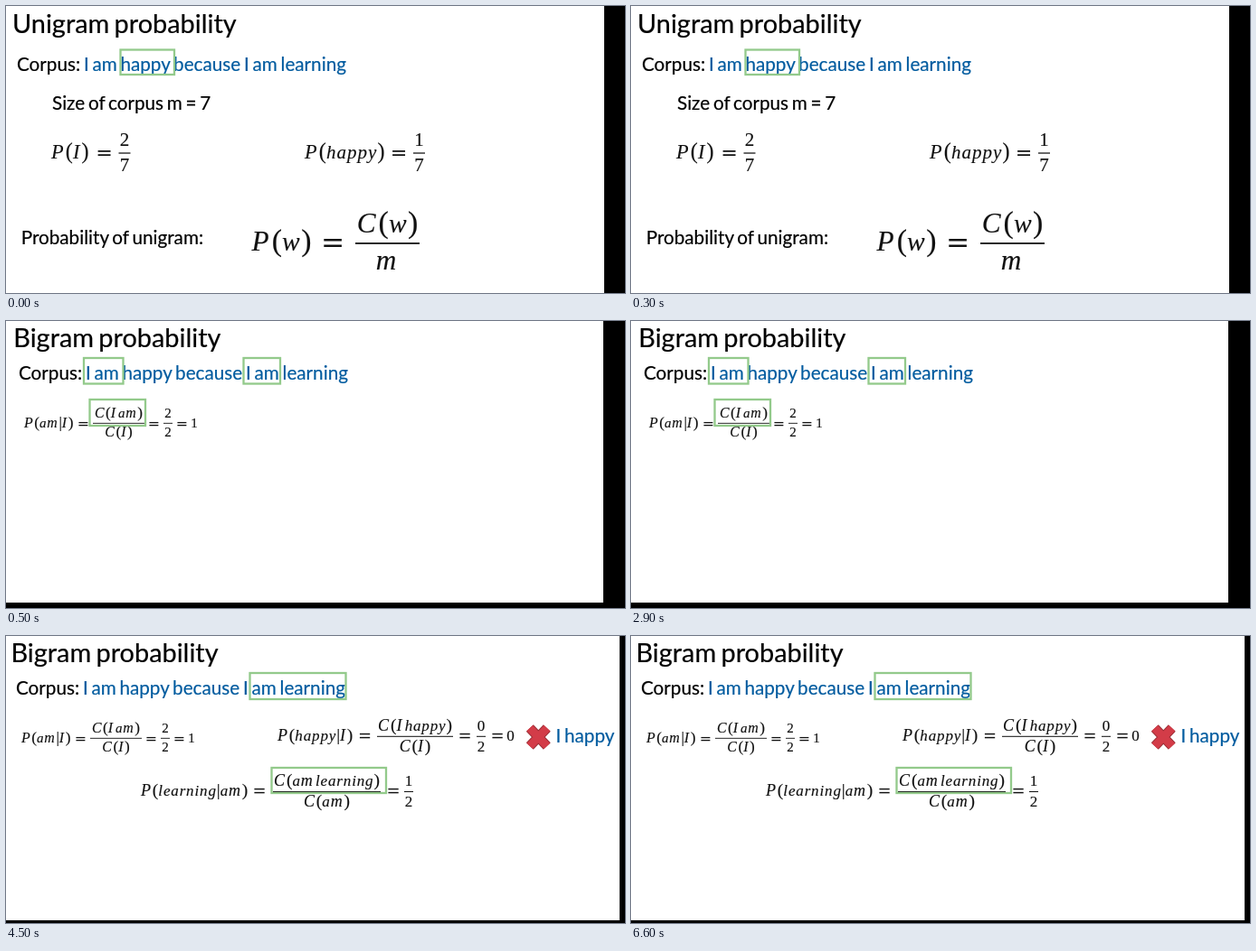
An HTML page for the animation above (8 s loop, 684x318 px).

```html
<!DOCTYPE html>
<html lang="en">
<head>
<meta charset="utf-8">
<title>N-gram probability</title>
<style>
  html, body { margin: 0; width: 100%; height: 100%; overflow: hidden; background: #000; }
  svg { display: block; }
  .sans { font-family: Lato, sans-serif; font-size: 20.7px; word-spacing: -.075em; stroke: #000; stroke-width: .2; }
  .title { font-size: 28.9px; }
  .blue { fill: #005b9f; stroke: #005b9f; }
  .math { font-family: "Liberation Serif", serif; fill: #111; stroke: #111; stroke-width: .15; }
  .equals { font-family: "DejaVu Serif", serif; fill: #111; }
  .low, .cap { font-style: italic; letter-spacing: .05em; }
  .cap { font-size: 1.06em; letter-spacing: .1em; }
  .paren { font-size: 1.15em; }
  .box { fill: none; stroke: #93ca8b; stroke-width: 2.3; }
</style>
</head>
<body>
<svg id="stage" width="684" height="318" viewBox="0 0 684 318"></svg>
<script>
const LOOP = 8000;

const sans = (x, y, text, cls = '') =>
  `<text class="sans ${cls}" x="${x}" y="${y}">${text}</text>`;

const corpus = (x, y) =>
  sans(x, y, 'Corpus: <tspan class="blue">I am happy because I am learning</tspan>');

const box = (x1, y1, x2, y2) =>
  `<rect class="box" x="${x1}" y="${y1}" width="${x2 - x1}" height="${y2 - y1}"/>`;

// Italic letters, upright taller parentheses, plain digits.
const glyphs = text => text.replace(/[A-Zm]|[a-ln-z]+|[()|]/g, run => {
  const cls = /[()|]/.test(run) ? 'paren' : /[A-Zm]/.test(run) ? 'cap' : 'low';
  return `<tspan class="${cls}">${run}</tspan>`;
});

const math = (x, y, size, text, anchor = 'middle') =>
  `<text class="math" x="${x}" y="${y}" font-size="${size}" text-anchor="${anchor}">${glyphs(text)}</text>`;

// The row helpers share one axis: the height of the fraction bars.
const row = (axis, size) => ({
  start: (x, text) => math(x, axis + size * .28, size, text, 'start'),
  mid: (x, text) => math(x, axis + size * .28, size, text),
  eq: x => `<text class="equals" x="${x}" y="${axis + size * .35}" font-size="${size * 1.06}" text-anchor="middle">=</text>`,
  frac: (x, width, num, den) =>
    math(x, axis - size * .4, size, num) +
    math(x, axis + size * .97, size, den) +
    `<rect x="${x - width / 2}" y="${axis - size * .03}" width="${width}" height="${size * .06}" fill="#111"/>`
});

const page = (width, height, body) =>
  `<rect width="${width}" height="${height}" fill="#fff"/>${body}`;

const cross = (x, y) => {
  const arms = 'd="M-9.5 -10L9.5 10M9.5 -10L-9.5 10" fill="none"';
  return `<g transform="translate(${x} ${y})">
    <path ${arms} stroke="#9c3038" stroke-width="11"/>
    <path ${arms} stroke="#d33c48" stroke-width="9"/></g>`;
};

function amGivenI(x) {
  const r = row(113.3, 15);
  return r.start(x, 'P(am|I)') + r.eq(x + 65.5) +
    r.frac(x + 104.5, 57, 'C(I\u200aam)', 'C(I)') + r.eq(x + 143.5) +
    r.frac(x + 159, 10, '2', '2') + r.eq(x + 174.5) + r.mid(x + 188, '1');
}

function unigram() {
  const small = row(163, 21), large = row(263, 29.5);
  return page(661, 318,
    sans(7, 29.5, 'Unigram probability', 'title') +
    corpus(12, 71.8) + box(126.5, 48.5, 186, 76) +
    sans(51, 114.5, 'Size of corpus m = 7') +
    small.start(50, 'P(I)') + small.eq(108.5) + small.frac(131, 13, '2', '7') +
    small.start(330, 'P(happy)') + small.eq(434) + small.frac(456.5, 13, '1', '7') +
    sans(16.7, 263.5, 'Probability of unigram:') +
    large.start(271.5, 'P(w)') + large.eq(361) + large.frac(421.5, 71, 'C(w)', 'm'));
}

function bigramFirst() {
  return page(660, 312,
    sans(8.3, 28.5, 'Bigram probability', 'title') +
    corpus(14, 65) + box(86, 41, 129.5, 69.5) + box(262.5, 41, 303, 69.5) +
    amGivenI(20) + box(92.5, 87, 154, 116));
}

function bigramAll() {
  const happy = row(111.3, 17), learn = row(172.5, 17);
  return page(678, 315,
    sans(5.5, 28.5, 'Bigram probability', 'title') +
    corpus(11, 65) + box(269.5, 41, 375.5, 70) +
    amGivenI(17) +
    happy.start(300, 'P(happy|I)') + happy.eq(396.5) +
    happy.frac(452, 84, 'C(I\u200ahappy)', 'C(I)') + happy.eq(507) +
    happy.frac(525, 10, '0', '2') + happy.eq(543) + happy.mid(557.5, '0') +
    cross(588.3, 112) + sans(607.5, 117.8, 'I happy', 'blue') +
    learn.start(149, 'P(learning|am)') + learn.eq(280) +
    learn.frac(354.5, 119, 'C(am\u200alearning)', 'C(am)') + learn.eq(428) +
    learn.frac(445, 10, '1', '2') + box(293.5, 146, 420, 174));
}

const scenes = [
  { from: 0, to: 500, draw: unigram },
  { from: 500, to: 4500, draw: bigramFirst },
  { from: 4500, to: LOOP, draw: bigramAll }
];

const stage = document.getElementById('stage');
stage.innerHTML = scenes.map(s => `<g visibility="hidden">${s.draw()}</g>`).join('');

const begin = performance.now();
function show() {
  const t = Math.max(0, performance.now() - begin) % LOOP;
  scenes.forEach((s, i) => {
    const on = t >= s.from && t < s.to;
    stage.children[i].setAttribute('visibility', on ? 'visible' : 'hidden');
  });
  requestAnimationFrame(show);
}
show();
</script>
</body>
</html>
```
